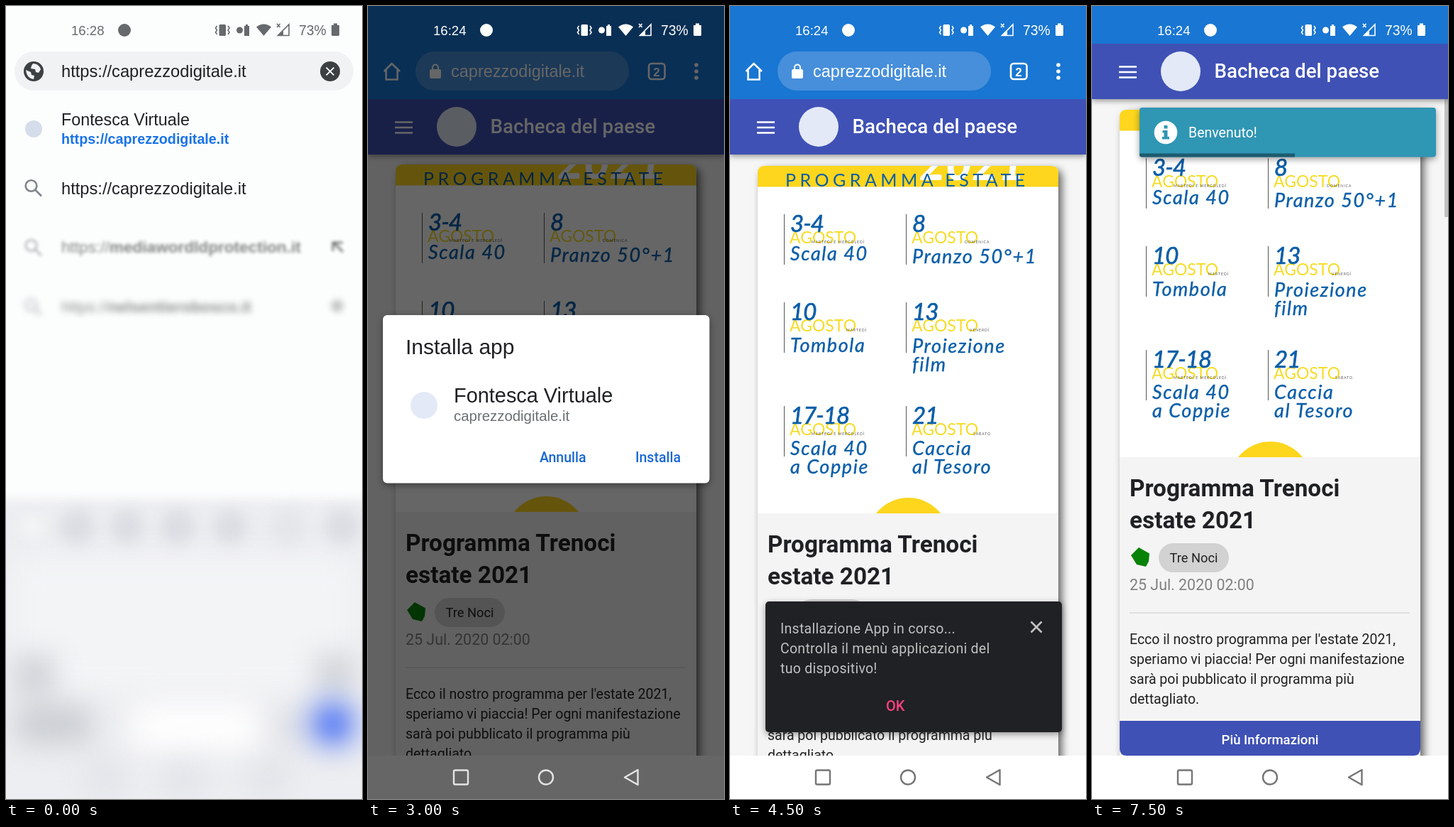
An HTML page for the animation above (9000 ms loop, 502x1116 px).

```html
<!DOCTYPE html>
<html lang="it">
<head>
<meta charset="utf-8">
<title>Installa app</title>
<style>
html, body { margin: 0; width: 100%; height: 100%; overflow: hidden; background: #fff; }
svg { display: block; width: 502px; height: 1116px; overflow: hidden; }
text { font-family: Roboto, sans-serif; font-size: 19.5px; white-space: pre; }
.scene { visibility: hidden; animation: show 9s step-end infinite; animation-delay: calc(var(--i) * 1.5s - 9s); }
@keyframes show { 0% { visibility: visible; } 16.6666%, 100% { visibility: hidden; } }
.ui { font-family: "Liberation Sans", Arial, sans-serif; }
.clock { font-size: 18.6px; fill: currentColor; }
.line { fill: none; stroke: currentColor; }
.mid { text-anchor: middle; }
.med { font-weight: 500; }
.bar { filter: drop-shadow(0 2px 4px rgba(0,0,0,.45)); }
.box { filter: drop-shadow(5px 5px 6px rgba(0,0,0,.6)); }
.pop { filter: drop-shadow(0 3px 5px rgba(0,0,0,.4)); }
.head { font-size: 33.3px; font-weight: 700; fill: #202124; }
.title { font: 25px Lato, sans-serif; letter-spacing: 5.5px; fill: #0b5ea8; }
.year { font: italic 800 64px Lato, sans-serif; fill: #fff; }
.month { font: 23px Lato, sans-serif; fill: #f6dc26; }
.tiny { font: 5px Lato, sans-serif; letter-spacing: 1px; fill: #555; }
.day, .pen { font: italic 33px Lato, sans-serif; letter-spacing: -1px; fill: #0b5ea8; stroke: #0b5ea8; stroke-width: .7px; }
.pen { font-size: 27px; letter-spacing: 1.6px; stroke-width: .4px; }
.snack { fill: #bfc0c1; letter-spacing: .27px; }
.pink { font-size: 20px; font-weight: 500; fill: #ff4081; }
.blur2 { filter: blur(2px); }
.blur4 { filter: blur(4px); }
.blur6 { filter: blur(6px); }
.blur10 { filter: blur(10px); }
.blur20 { filter: blur(20px); }
</style>
</head>
<body>
<svg viewBox="0 0 502 1116">
<defs>
  <linearGradient id="sky" x2="0" y2="1">
    <stop offset="0" stop-color="#e2e4e4"/><stop offset=".3" stop-color="#e6e9eb"/>
    <stop offset=".5" stop-color="#e5f0f7"/><stop offset=".68" stop-color="#f3f8fa"/>
    <stop offset=".93" stop-color="#edf1f3"/><stop offset="1" stop-color="#dfe3e5"/>
  </linearGradient>
  <linearGradient id="dusk" x2="0" y2="1">
    <stop offset="0" stop-color="#85888c" stop-opacity="0"/><stop offset=".55" stop-color="#85888c" stop-opacity=".8"/>
    <stop offset="1" stop-color="#808387"/>
  </linearGradient>
  <linearGradient id="rose" x2="0" y2="1">
    <stop offset="0" stop-color="#d98f9a"/><stop offset=".5" stop-color="#dfa5ae"/>
    <stop offset="1" stop-color="#e9c9d0" stop-opacity="0"/>
  </linearGradient>
  <clipPath id="round"><path d="M39 712V233q0-10 10-10h404q10 0 10 10v479z"/></clipPath>

  <g id="status" fill="currentColor">
    <circle cx="167" cy="34" r="9"/>
    <rect x="300.5" y="26" width="9.5" height="16" rx="1.5"/>
    <path class="line" stroke-width="1.6" d="M297.5 28l-2 3 2 3-2 3 2 3M313 28l2 3-2 3 2 3-2 3"/>
    <circle cx="329.5" cy="34" r="4.5"/>
    <path d="M336 28h2v-2h3v2h2v14h-7z"/>
    <path d="M353 29.5Q363.5 21.5 374 29.5L363.5 42z"/>
    <path class="line" stroke-width="1.6" d="M399 26v15.500h-15.500zM382 25l4.500 5m0-5l-4.500 5"/>
    <path d="M391 35v6.500h-7.500z"/>
    <text class="ui" x="413" y="40.5" style="font-size:19.3px">73%</text>
    <path d="M459 27h3v-2.500h5v2.500h3v13.500q0 1.500-1.500 1.500h-8q-1.500 0-1.500-1.500z"/>
  </g>

  <g id="browser" color="#fff" fill="#fff">
    <rect width="502" height="131" fill="#1976d2"/>
    <path class="line" stroke-width="2.5" d="M22.500 92L33.500 81 45 92M25.500 90v13.500h16V90"/>
    <rect x="67" y="64" width="301" height="55" rx="27.5" fill="#478fdb"/>
    <rect x="87" y="89" width="16" height="13" rx="2"/>
    <path class="line" stroke-width="2" d="M91 90v-3.500a4 4 0 0 1 8 0V90"/>
    <text class="ui" x="117" y="100" style="font-size:23.5px">caprezzodigitale.it</text>
    <rect class="line" stroke-width="2.6" x="396" y="81" width="22.5" height="22" rx="4"/>
    <text class="ui mid" x="407" y="98.5" font-weight="700" style="font-size:17px">2</text>
    <circle cx="463" cy="83" r="2.8"/><circle cx="463" cy="92" r="2.8"/><circle cx="463" cy="101" r="2.8"/>
  </g>

  <g id="appbar">
    <rect class="bar" y="131" width="502" height="78" fill="#3f51b5"/>
    <path d="M38 163.500h25M38 171h25M38 178.500h25" stroke="#fff" stroke-width="2.7"/>
    <circle cx="125" cy="170" r="28" fill="#e3e9f6"/>
    <text class="med" x="172.5" y="179" fill="#fff" style="font-size:27.7px">Bacheca del paese</text>
  </g>

  <g id="card">
    <rect class="box" x="39" y="223" width="424" height="920" rx="10" fill="#f4f4f4"/>
    <g clip-path="url(#round)">
      <path fill="#fff" d="M39 223h424v489H39z"/>
      <path fill="#fdd61d" d="M39 223h424v29.500H39z"/>
      <text class="year" x="267" y="243">2021</text>
      <text class="title" x="78" y="251.5">PROGRAMMA ESTATE</text>
      <g id="days"></g>
      <circle cx="251.5" cy="748" r="58" fill="#fdd61d"/>
    </g>
    <text class="head" x="53" y="767">Programma Trenoci</text>
    <text class="head" x="53" y="812">estate 2021</text>
    <path fill="#078207" d="M55 850l11-11 15 8.500-1 11-4 7.500-13-3z"/>
    <rect x="94" y="833" width="99" height="41" rx="20.5" fill="#d2d2d2"/>
    <text class="mid" x="143.5" y="860" fill="#222" style="font-size:18.3px">Tre Noci</text>
    <text x="53" y="898.5" fill="#808080" style="font-size:21.4px">25 Jul. 2020 02:00</text>
    <path d="M53 931h395" stroke="#ccc" stroke-width="1.2"/>
    <g fill="#222">
      <text x="53" y="974.5">Ecco il nostro programma per l'estate 2021,</text>
      <text x="53" y="1002.5">speriamo vi piaccia! Per ogni manifestazione</text>
      <text x="53" y="1030.5">sarà poi pubblicato il programma più</text>
      <text x="53" y="1058.5">dettagliato.</text>
    </g>
  </g>

  <path id="page" fill="#f6f6f6" d="M0 0h502v1116H0z"/>
  <path id="foot" fill="#fff" d="M0 1055h502v61H0z"/>
  <g id="nav" class="line" stroke-width="2.4">
    <rect x="121" y="1075.5" width="20" height="20" rx="2"/>
    <circle cx="251" cy="1085.5" r="10"/>
    <path stroke-linejoin="round" d="M362 1085.500l18.500-10.500v21z"/>
  </g>
  <g id="lens" class="line" stroke-width="2.6" color="#80868b">
    <circle cx="35.5" cy="253" r="7.8"/><path d="M41 258.500l9 9"/>
  </g>
  <path id="cross" class="line" stroke-width="2.6" d="M-7.500-7.500l15 15m0-15l-15 15"/>
</defs>

<!-- address search -->
<g class="scene" style="--i:0">
  <path fill="#fcfdfd" d="M0 0h502v1116H0z"/>
  <g color="#666a6d"><use href="#status"/><text class="ui clock" x="92" y="40.5">16:28</text></g>
  <rect x="12" y="64" width="478" height="55" rx="27.5" fill="#f1f2f4"/>
  <circle cx="39" cy="92" r="14" fill="#3c4043"/>
  <path fill="#f1f2f4" d="M28 90l7 3 1 4 4 1-1 5q-10-1-11-13zM38 81q8 0 11 8l-3 5-4-1-1-4-6-1 1-4z"/>
  <circle cx="457" cy="92" r="14" fill="#3c4043"/>
  <use href="#cross" transform="translate(457 92) scale(.72)" color="#fff"/>
  <g fill="#202124">
    <text class="ui" x="78" y="100" style="font-size:23.7px">https://caprezzodigitale.it</text>
    <text class="ui" x="78" y="168" style="font-size:23.3px">Fontesca Virtuale</text>
    <text class="ui" x="78" y="264.5" style="font-size:23.7px">https://caprezzodigitale.it</text>
  </g>
  <text class="ui" x="78" y="193.5" fill="#1a73e8" font-weight="700" style="font-size:19.7px">https://caprezzodigitale.it</text>
  <circle cx="39" cy="173" r="12" fill="#d5dcea"/>
  <use href="#lens"/>
  <g class="blur2" opacity=".6">
    <use href="#lens" y="84"/>
    <text class="ui" x="78" y="347" fill="#333" style="font-size:22.6px">https://<tspan font-weight="700">mediawordldprotection.it</tspan></text>
    <path class="line" stroke="#555" stroke-width="2.6" d="M475 346l-13-13M461 345v-12h14"/>
  </g>
  <g class="blur4" opacity=".55">
    <use href="#lens" y="168"/>
    <text class="ui" x="78" y="431" fill="#333" style="font-size:22px">https://<tspan font-weight="700">nelsentierobosco.it</tspan></text>
    <circle cx="467" cy="422" r="9" fill="#999"/>
  </g>
  <path class="blur6" fill="#edeef1" d="M-30 694h562v460H-30z"/>
  <g class="blur20">
    <path fill="#f3f4f6" d="M10 775h482v190H10z"/>
    <path fill="#c9ccd1" d="M15 915h52v50H15zM15 985h105v52H15zM438 914h50v46h-50z"/>
    <path fill="#fff" d="M178 985h178v60H178z"/>
    <path fill="#d8dae0" d="M385 990h30v50h-30z"/>
    <rect x="428" y="977" width="66" height="66" rx="30" fill="#6484f2"/>
    <g fill="#e1e3e8"><circle cx="140" cy="1086" r="30"/><circle cx="250" cy="1086" r="30"/><circle cx="370" cy="1086" r="30"/></g>
  </g>
  <g class="blur10" fill="#dbdde3">
    <circle cx="36" cy="733" r="16" fill="#f4f5f6"/>
    <circle cx="100" cy="733" r="25"/><circle cx="171" cy="733" r="24"/><circle cx="242" cy="733" r="25"/>
    <circle cx="316" cy="733" r="24"/><circle cx="398" cy="733" r="26" fill="#e4e6ea"/><circle cx="474" cy="733" r="25"/>
  </g>
  <circle class="blur10" cx="461" cy="1011" r="12" fill="#6b8cf5"/>
</g>

<!-- install hint -->
<g class="scene" style="--i:1">
  <use href="#page"/><use href="#card"/><use href="#appbar"/><use href="#browser"/>
  <g color="#fff"><use href="#status"/><text class="ui clock" x="92" y="40.5">16:23</text></g>
  <use href="#foot"/><use href="#nav" color="#757575"/>
  <rect class="pop" x="50" y="894" width="418" height="128" rx="5" fill="#202124"/>
  <text class="snack" x="102.5" y="939">Installa l'app sul tuo telefono!</text>
  <use href="#cross" x="432" y="930" color="#c2c2c2"/>
  <text class="pink" x="94" y="992">OK</text><text class="pink" x="165" y="992">No, grazie</text><text class="pink" x="301" y="992">Non ora</text>
</g>

<!-- install dialog -->
<g class="scene" style="--i:2">
  <use href="#page"/><use href="#card"/><use href="#appbar"/><use href="#browser"/><use href="#foot"/>
  <path fill="#000" opacity=".6" d="M0 0h502v1116H0z"/>
  <g color="#fff"><use href="#status"/><text class="ui clock" x="92" y="40.5">16:24</text></g>
  <use href="#nav" color="#e4e4e4"/>
  <rect class="pop" x="21" y="435" width="460.5" height="236.5" rx="6" fill="#fff"/>
  <text class="ui" x="53" y="490" fill="#202124" style="font-size:30px">Installa app</text>
  <circle cx="79" cy="562" r="19" fill="#e3e9f6"/>
  <text class="ui" x="121" y="557.5" fill="#202124" style="font-size:28.9px">Fontesca Virtuale</text>
  <text class="ui" x="121" y="584" fill="#6b6f73" style="font-size:20.4px">caprezzodigitale.it</text>
  <g class="med" fill="#1967d2"><text x="242" y="642">Annulla</text><text x="377" y="642">Installa</text></g>
</g>

<!-- installing -->
<g class="scene" style="--i:3">
  <use href="#page"/><use href="#card" y="2"/><use href="#appbar"/><use href="#browser"/>
  <g color="#fff"><use href="#status"/><text class="ui clock" x="92" y="40.5">16:24</text></g>
  <use href="#foot"/><use href="#nav" color="#757575"/>
  <rect class="pop" x="50" y="838" width="418" height="184" rx="5" fill="#202124"/>
  <text class="snack" x="71" y="883">Installazione App in corso...</text>
  <text class="snack" x="71" y="911">Controlla il menù applicazioni del</text>
  <text class="snack" x="71" y="939">tuo dispositivo!</text>
  <use href="#cross" x="432" y="874" color="#c2c2c2"/>
  <text class="pink" x="220" y="992">OK</text>
</g>

<!-- app drawer -->
<g class="scene" style="--i:4">
  <path fill="url(#sky)" d="M0 0h502v1116H0z"/>
  <path class="blur20" fill="#f5e9da" d="M235-30h180v130l-25 200-80-120z"/>
  <g class="line blur6">
    <path stroke="#f8fafa" stroke-width="30" d="M432 180C400 430 350 590 290 720"/>
    <path stroke="#d6dde0" stroke-width="7" d="M406 310C370 520 320 670 240 800S90 980 0 1040"/>
    <path stroke="#d9e0e3" stroke-width="6" d="M472 320C430 540 380 700 270 840S160 980 100 1030"/>
  </g>
  <path class="blur2" fill="url(#rose)" d="M494 238h8v600h-8z"/>
  <path class="blur2" fill="#a00c1c" d="M492 172h16v64h-16z"/>
  <g class="blur10" fill="#9a9c9e" opacity=".75">
    <rect x="92" y="27" width="48" height="14"/><circle cx="170" cy="34" r="9"/><circle cx="305" cy="34" r="12"/>
    <circle cx="334" cy="34" r="11"/><circle cx="364" cy="34" r="12"/><circle cx="392" cy="34" r="10"/>
    <rect x="414" y="27" width="38" height="13"/><circle cx="463" cy="34" r="12"/>
  </g>
  <g class="blur6" fill="#d0607a" opacity=".75">
    <circle cx="163" cy="127" r="9"/><text class="ui" x="196" y="134" font-weight="700" style="font-size:21px">Cerca nelle app</text>
    <path opacity=".5" d="M30 162h442v5H30z"/><path fill="#777" d="M443 113h5v24h-5z"/>
  </g>
  <g id="apps"></g>
  <path fill="url(#dusk)" d="M0 1020h502v96H0z"/>
</g>

<!-- installed app -->
<g class="scene" style="--i:5">
  <use href="#page"/><use href="#card" y="-77"/>
  <path fill="#3f51b5" d="M39 1006h424v39q0 10-10 10H49q-10 0-10-10z"/>
  <text class="med mid" x="251" y="1038.5" fill="#fff" style="font-size:18.6px">Più Informazioni</text>
  <path fill="#c1c1c1" d="M497 131h5v166h-5z"/>
  <use href="#appbar" y="-78"/>
  <path fill="#1976d2" d="M0 0h502v53H0z"/>
  <g color="#fff"><use href="#status"/><text class="ui clock" x="92" y="40.5">16:24</text></g>
  <rect class="pop" x="67" y="143" width="418" height="69.5" rx="4" fill="#2f96b4"/>
  <path fill="#1d5b6e" d="M67 207.500h219v5H70q-3 0-3-3z"/>
  <circle cx="104" cy="178" r="16.3" fill="#fff"/>
  <path fill="#2f96b4" d="M101.500 168h5v4.500h-5zM99.500 175h7v9h2.500v3.500h-10V184h2.500v-5.500h-2z"/>
  <text x="136" y="185" fill="#fff">Benvenuto!</text>
  <use href="#foot"/><use href="#nav" color="#757575"/>
</g>
</svg>
<script>
const txt = (cls, x, y, s) => `<text class="${cls}" x="${x}" y="${y}">${s}</text>`;
const disc = (x, y, r, fill) => `<circle cx="${x}" cy="${y}" r="${r}" fill="${fill}"/>`;

// Programme: column x, row y, day, weekday, weekday x, event lines, event baseline
const days = [
  [77, 291, "3-4", "MARTEDÌ E MERCOLEDÌ", 115, "Scala 40", 356],
  [249, 291, "8", "DOMENICA", 331, "Pranzo 50°+1", 360],
  [77, 415, "10", "MARTEDÌ", 164, "Tombola", 485],
  [249, 415, "13", "VENERDÌ", 338, "Proiezione|film", 486],
  [77, 561, "17-18", "MARTEDÌ E MERCOLEDÌ", 115, "Scala 40|a Coppie", 630],
  [249, 561, "21", "SABATO", 343, "Caccia|al Tesoro", 630]
];
document.getElementById("days").innerHTML = days.map(([x, y, day, name, nx, what, base]) =>
  `<path d="M${x - .5} ${y}v71" stroke="#555"/>` +
  txt("month", x + 7, y + 41, "AGOSTO") + txt("tiny", nx, y + 41, name) +
  txt("day", x + 8, y + 25, day) +
  what.split("|").map((s, i) => txt("pen", x + 8, base + i * 26, s)).join("")
).join("");

// Drawer: "label|second line" (* marks a new app), colour, radius of the mark on a white plate
const apps = [
  ["Appunti|note", "#86d6fb"], ["Amici|Shopping", "#c9a255"], ["Assistent|e", "#4679e6", 13], ["Auricla", "#f0902e"], ["Motorvi", "#9c0c12"],
  ["*Bussola", "#3d434e"], ["*Browse...", "#3d96f0", 19], ["Calcolatri|ce", "#3034cf"], ["Calendar", "#4480e6"], ["*Fontesc...", "#f7f8f9"],
  ["Nuvole|condivise", "#9fb0d2"], ["Camera", "#f15c38"], ["Nimbro", "#dd5344", 20], ["Siege of|Brovs", "#c48a2c"], ["Duel|Corvane", "#4a6f93"],
  ["Corse|treno", "#d05654", 19], ["Cucina|it", "#e04a4a", 15], ["Contatti", "#3757d4"], ["Cuffia|Radio", "#3a4358"], ["*Dispositi", "#2c2c2c"],
  ["Disco", "#dcd3c2", 24], ["Diario", "#8f9de6"], ["Dolci|ricette", "#f2a4ac", 13], ["Esame|verde", "#97bda6", 23], ["Foto", "#e9a56c", 19],
  ["", "#7c8085"], ["", "#2a78cc"], ["", "#7d75d2"], ["", "#f0aa48"], ["", "#ee7c68"]
];

// Blur and fade grow with the distance from the new app
const haze = (far, blur, fade, least) =>
  `style="${far ? `filter:blur(${(far * blur).toFixed(1)}px);` : ""}opacity:${Math.max(least, 1 - far / fade).toFixed(2)}"`;

document.getElementById("apps").innerHTML = apps.map(([label, color, mark], i) => {
  const x = 63 + i % 5 * 93.8, y = 243 + Math.floor(i / 5) * 162.5;
  const far = Math.max(0, Math.hypot(x - 438, y - 406) - 100);
  const dot = label[0] === "*";
  const lines = label.replace("*", "").split("|");
  return `<g ${haze(far, .022, 1600, 0)}>` +
    disc(x, y, 31, mark ? "#fbfcfd" : color) + (mark ? disc(x, y, mark, color) : "") + "</g>" +
    `<g ${haze(far, .024, 280, .3)} fill="#55585b">` +
    (dot ? disc(x, y + 54, 5.5, "#2f6bff") : "") +
    lines.map((s, n) => `<text class="ui mid" x="${x}" y="${y + (dot ? 85 : 62) + n * 24}" style="font-size:18.5px">${s}</text>`).join("") + "</g>";
}).join("");
</script>
</body>
</html>
```
